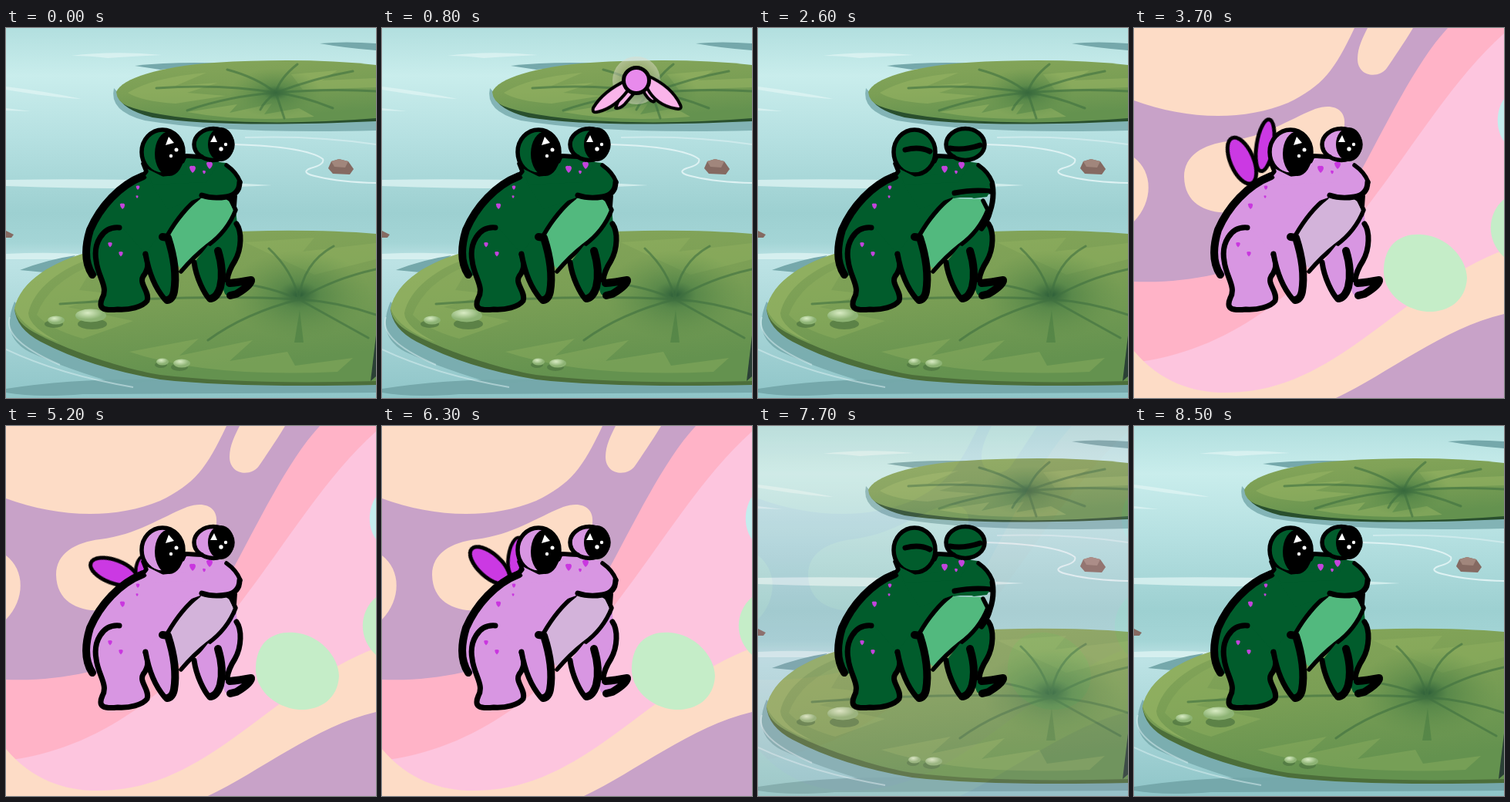
Recreate the animation shown at these times as an HTML page. Size 480 by 480 pixels, loop 8.6 s.

```html
<!DOCTYPE html>
<html lang="en">
<head>
<meta charset="utf-8">
<title>Frog daydream</title>
<style>
html, body { margin: 0; width: 100%; height: 100%; overflow: hidden; background: #bfe6e6; }
svg { display: block; width: 100%; height: 100%; }

.ink { fill: none; stroke: #000; stroke-linecap: round; stroke-linejoin: round; stroke-width: 7; }
.fine { stroke-width: 5.5; }
.bold { stroke-width: 10; }
.skin { fill: #015c2c; }
.belly { fill: #52b97e; }
.spot { fill: #c244dc; }
.vein { fill: none; stroke: #3f7040; stroke-linecap: round; opacity: .6; }

.dream, .skin, .belly, .spot, .open, .closed, .wings, .fairy { animation: 8.6s linear infinite; }
.skin { animation-name: skin; }
.belly { animation-name: belly; }
.spot { animation-name: spot; }
.open { animation-name: open; }
.closed { animation-name: closed; }
.wings { animation-name: trip; }
.skin, .belly, .spot, .open, .closed, .wings { animation-timing-function: step-end; }
.dream { animation-name: dissolve; }
.fairy { animation-name: visit; }

@keyframes skin { 0%, 80.23% { fill: #015c2c } 38.37% { fill: #d896e2 } 100% { fill: #015c2c } }
@keyframes belly { 0%, 80.23% { fill: #52b97e } 38.37% { fill: #d3b3da } 100% { fill: #52b97e } }
@keyframes spot { 0%, 80.23% { fill: #c244dc } 38.37% { fill: #c936df } 100% { fill: #c244dc } }
@keyframes trip { 0%, 80.23%, 100% { opacity: 0 } 38.37% { opacity: 1 } }
@keyframes open { 0%, 38.37%, 91.86%, 100% { opacity: 1 } 25.58%, 77.9% { opacity: 0 } }
@keyframes closed { 0%, 38.37%, 91.86%, 100% { opacity: 0 } 25.58%, 77.9% { opacity: 1 } }
@keyframes dissolve { 0%, 32.56% { opacity: 0 } 40.7%, 81.4% { opacity: 1 } 90.7%, 100% { opacity: 0 } }
@keyframes visit {
  0%, 1.1% { transform: translate(220px, -60px); animation-timing-function: ease-out }
  9.3% { transform: none; opacity: 1; animation-timing-function: ease-in-out }
  16.3% { transform: translate(-5px, 4px); animation-timing-function: ease-in }
  23.2% { transform: translate(-40px, 142px) scale(.25); opacity: 1 }
  23.3%, 100% { transform: translate(-40px, 142px) scale(.25); opacity: 0 }
}

.far, .near { animation: calc(8.6s / 14) ease-in-out infinite; }
.near { animation-name: near; }
.far { animation-name: far; }
@keyframes near {
  0%, 100% { transform: translate(140px, 172px) rotate(-23deg) }
  50% { transform: translate(140px, 189px) rotate(-70deg) }
}
@keyframes far {
  0%, 100% { transform: translate(170px, 152px) rotate(9deg) }
  50% { transform: translate(178px, 185px) rotate(9deg) scale(.85, .5) }
}
.flutter { animation: flutter calc(8.6s / 22) ease-in-out infinite; }
@keyframes flutter { 0%, 100% { transform: none } 50% { transform: scale(1, .45) } }
</style>
</head>
<body>
<svg viewBox="0 0 480 480" preserveAspectRatio="none">
<defs>
  <linearGradient id="water" x2="0" y2="1">
    <stop offset="0" stop-color="#b2dfdf"/><stop offset=".13" stop-color="#c9edec"/>
    <stop offset=".3" stop-color="#b5e0e1"/><stop offset=".5" stop-color="#9dd0d1"/>
    <stop offset=".58" stop-color="#a4d5d6"/><stop offset=".63" stop-color="#bde3e5"/>
    <stop offset="1" stop-color="#8fc5c8"/>
  </linearGradient>
  <linearGradient id="leaf" x2=".3" y2="1">
    <stop offset="0" stop-color="#86a65a"/><stop offset=".5" stop-color="#7b9f55"/><stop offset="1" stop-color="#64924f"/>
  </linearGradient>
  <radialGradient id="heart">
    <stop offset="0" stop-color="#2b5c38"/><stop offset=".3" stop-color="#477c44" stop-opacity=".6"/>
    <stop offset="1" stop-color="#5c8c4a" stop-opacity="0"/>
  </radialGradient>
  <radialGradient id="drop" cx=".4" cy=".3">
    <stop offset="0" stop-color="#d9ecc4"/><stop offset="1" stop-color="#8db374"/>
  </radialGradient>
  <radialGradient id="glow">
    <stop offset=".4" stop-color="#d8c8b8" stop-opacity=".2"/><stop offset="1" stop-color="#dfdccb" stop-opacity=".5"/>
  </radialGradient>
  <path id="fleck" d="M-4-3Q-2-5 0-4Q3-5 4-2Q4 2 0 5Q-4 1-4-3Z"/>
</defs>

<g id="pond">
  <path fill="url(#water)" d="M0 0H480V480H0Z"/>
  <g fill="#e0f5f4" opacity=".75">
    <path d="M85 36Q140 29 202 35Q160 37 132 39Q110 36 85 36Z"/>
    <path d="M0 76Q50 82 98 92Q60 90 0 80Z"/>
    <path d="M0 104L32 108L0 107Z"/>
    <path d="M0 197Q180 194 345 204Q200 212 0 205Z"/>
    <path d="M0 293Q60 290 104 294L70 300H0Z"/>
  </g>
  <g fill="#75a8ab">
    <path d="M167 49Q220 43 290 46L200 54Z"/>
    <path d="M407 20Q440 17 480 20V29Q440 26 407 20Z"/>
    <path d="M18 314Q55 300 90 295L60 318Z"/>
    <path d="M0 468Q90 454 200 456L480 458V473Q250 474 100 475Q40 480 0 473Z"/>
    <path d="M11 355Q-8 400 30 420Q80 443 150 463L210 455L40 385Z" opacity=".85"/>
    <path d="M140 78Q133 108 180 120Q290 138 480 133V112L160 100Z" opacity=".8"/>
  </g>
  <g fill="none" stroke="#def2f3" stroke-width="2">
    <path d="M296 151Q390 154 411 170Q414 177 395 182Q380 188 405 193Q435 200 480 201"/>
    <path d="M310 142Q400 139 480 151" opacity=".6"/>
    <path d="M0 417Q70 450 165 466M5 375Q-5 405 70 437" opacity=".5"/>
  </g>

  <path fill="#294f2d" d="M144 86Q150 106 190 116Q280 130 480 121V110L150 90Z"/>
  <path fill="url(#leaf)" d="M143 83C150 65 200 50 270 45Q390 38 480 48V117Q370 126 270 120Q190 114 157 101Q144 95 143 83Z"/>
  <g fill="#9ab765" opacity=".5">
    <path d="M158 84Q190 64 260 58L220 75L275 71L235 84L285 88L220 98Q175 95 158 84Z"/>
    <path d="M235 109L300 99L290 110L345 98L335 112L380 104L400 115Q310 123 235 109Z"/>
    <path d="M370 60L430 55L410 68L480 65V77L385 80Z"/>
  </g>
  <ellipse cx="350" cy="84" rx="60" ry="32" fill="url(#heart)"/>
  <g class="vein" stroke-width="3">
    <path d="M350 84Q290 88 235 107M350 84Q280 72 195 78M350 84Q325 64 287 54M350 84Q355 65 378 47M350 84Q400 65 450 56M350 84Q420 78 480 82M350 84Q385 88 424 104M350 84Q335 95 330 106M350 84L361 117"/>
  </g>

  <path fill="#4c6e3a" d="M11 364Q13 390 45 407Q110 441 200 456Q300 467 480 463V440L30 370Z"/>
  <path fill="url(#leaf)" d="M11 364C19 328 60 303 110 290Q220 264 340 263Q420 262 480 267V458Q310 463 200 450C140 440 60 410 30 391Q13 380 11 364Z"/>
  <path fill="#9ab766" opacity=".6" d="M11 364C19 328 60 303 110 290L120 296C70 310 35 340 29 370Q30 388 70 408Q22 391 11 364Z"/>
  <g fill="#98b764" opacity=".35">
    <path d="M40 372Q55 330 115 306L95 340L140 345L80 362L165 380L100 403Q55 390 40 372Z"/>
    <path d="M160 420L250 403L225 425L320 405L290 432L365 420L375 438L450 428L430 446Q260 454 160 420Z"/>
    <path d="M310 278L400 272L385 290L480 279V300L400 320Z"/>
  </g>
  <ellipse cx="380" cy="346" rx="92" ry="58" fill="url(#heart)"/>
  <g class="vein" stroke-width="3">
    <path d="M380 352Q372 315 341 286M380 352Q425 325 480 313M380 352Q310 370 262 405M380 352Q250 345 70 358M380 352Q430 355 480 372M380 352Q430 380 470 402M380 352Q385 305 425 283M380 352Q340 335 305 332"/>
    <path d="M381 366L374 408L386 408Z" fill="#4b7e43" stroke="none"/>
  </g>
  <g fill="#4d7440" opacity=".7">
    <ellipse cx="112" cy="384" rx="19" ry="7"/><ellipse cx="62" cy="384" rx="12" ry="5"/>
    <ellipse cx="201" cy="437" rx="8" ry="4"/><ellipse cx="225" cy="440" rx="11" ry="5"/>
  </g>
  <g fill="url(#drop)">
    <ellipse cx="110" cy="373" rx="20" ry="8.5"/><ellipse cx="65" cy="379" rx="11" ry="5.5"/>
    <ellipse cx="203" cy="433" rx="8" ry="4.5"/><ellipse cx="228" cy="435" rx="11" ry="5.5"/>
  </g>
  <path fill="#856a62" d="M418 182L422 173L432 170L444 173L451 183L446 190L424 189Z"/>
  <path fill="#a1867c" d="M422 173L432 170L444 173L440 181L426 180Z"/>
  <path fill="#856a62" d="M0 263L10 268L7 272H0Z"/>
  <path fill="#2b4036" d="M480 399L473 458L480 452Z"/>
</g>

<g class="dream">
  <path fill="#ffb3c7" d="M0 0H480V480H0Z"/>
  <path fill="#c8a2c8" d="M0 0H407C365 45 325 130 292 190C240 280 130 334 0 329Z"/>
  <path fill="#fdc5de" d="M480 7C415 65 365 150 305 228C220 345 120 420 0 434V480H480Z"/>
  <g fill="#fddcc6">
    <path d="M0 0H286C260 55 245 75 200 97C140 122 65 118 0 94Z"/>
    <path d="M303 0H362C350 20 336 40 328 52C318 66 290 64 290 40C290 25 297 12 303 0Z"/>
    <path d="M65 193C65 165 90 151 122 147C170 141 200 119 235 105C258 97 275 105 273 126C270 165 225 200 185 220C150 246 66 254 65 193Z"/>
    <path d="M0 168C25 187 25 225 0 251Z"/>
    <path d="M0 419C40 466 90 477 140 472C270 461 345 340 480 288V480H0Z"/>
  </g>
  <path fill="#c8a2c8" d="M262 480C330 448 400 390 480 371V480Z"/>
  <g fill="#c5edc8">
    <path d="M324 312C326 278 348 266 374 268C405 270 432 298 432 325C430 355 407 369 380 368C347 365 322 340 324 312Z"/>
    <path d="M480 222C457 242 457 276 480 297Z"/>
  </g>
  <path fill="#c4edee" d="M480 92C469 108 469 132 480 147Z"/>
</g>

<g class="fairy"><g transform="translate(330 68)">
  <circle r="31" fill="url(#glow)"/>
  <g class="flutter ink" style="fill:#fab4ea;stroke-width:4">
    <path d="M-10 12Q-22 20-27 36Q-22 38-15 31L-4 18Z"/>
    <path d="M8 12Q15 26 22 28Q28 26 18 10Z"/>
    <path d="M-13 0Q-43 14-56 36Q-58 44-49 41Q-28 36-11 13Z"/>
    <path d="M15-6Q46 8 57 32Q60 39 51 37Q25 32 14 10Z"/>
  </g>
  <circle r="16.5" fill="#e88aec" stroke="#000" stroke-width="5"/>
</g></g>

<g id="frog">
  <g class="wings ink" style="fill:#cb39e3;stroke-width:5">
    <ellipse class="far" rx="11" ry="34"/>
    <ellipse class="near" rx="15" ry="32"/>
  </g>

  <path class="skin" d="M298 236L300 254C308 264 308 285 299 304Q290 318 288 331Q308 322 320 327Q322 334 300 347Q288 350 284 345L262 282Z"/>
  <path class="ink" d="M299 254C306 264 306 286 297 302Q288 316 287 327"/>
  <path class="ink bold" d="M290 331Q302 330 318 327Q319 333 299 345L291 347"/>
  <path class="skin" d="M178 190C145 202 112 245 104 285L112 322L180 310L214 300L247 222L300 215L285 175L205 165Z"/>
  <path class="ink bold" d="M178 192C147 204 122 232 109 262C102 285 102 305 112 320"/>
  <path class="belly" d="M249 221L291 222L298 240Q287 264 262 282Q244 296 230 314L212 300L210 268Z"/>
  <path class="ink fine" d="M250 220Q228 237 210 268M292 224L298 236Q287 264 262 282Q243 297 227 316"/>
  <path class="skin" d="M246 302C246 322 257 344 264 353Q273 357 281 338Q285 315 277 287L262 282Z"/>
  <path class="ink" d="M244 304C247 325 257 344 264 352"/>
  <path class="ink bold" d="M266 351Q274 349 278 336Q283 315 275 289"/>

  <path class="skin" d="M180 190L210 160L234 168L264 168L288 179Q300 188 304 202Q300 219 282 220L252 220L210 235Z"/>
  <path class="ink fine" d="M229 173L232 166L254 167M286 178Q299 187 304 200"/>
  <g class="open">
    <path class="ink" d="M303 200Q303 216 286 219Q268 222 254 217"/>
    <path d="M284 221L300 217L298 245L291 226Z"/>
  </g>
  <g class="closed">
    <path class="ink" d="M255 214Q282 209 301 212M304 203Q307 220 301 238Q298 250 290 260"/>
    <path class="skin" d="M266 216L300 214L297 219L280 221Z"/>
  </g>

  <path class="skin" d="M150 258C125 256 113 280 117 302C119 322 134 335 125 350C119 364 126 367 145 366C160 367 177 362 184 354C187 342 172 332 178 322Q187 309 180 292Z"/>
  <path class="ink" d="M147 259C125 257 113 280 117 302C119 322 133 336 125 350C119 364 126 367 145 365C160 366 177 362 183 354C187 342 172 332 178 322Q188 309 181 294"/>
  <path class="skin" d="M181 293C184 316 194 341 204 352Q216 360 221 343Q225 316 213 270L199 268Z"/>
  <path class="ink" d="M181 293C185 316 194 338 206 352"/>
  <path class="ink bold" d="M209 353Q216 352 218 342Q223 312 210 272L203 271"/>

  <g class="ink fine">
    <ellipse class="skin" cx="203" cy="161" rx="27" ry="29"/>
    <ellipse class="skin" cx="269" cy="151" rx="25" ry="20.5"/>
  </g>
  <path class="skin" d="M182 182L204 193L234 190L234 171L254 172L274 178L260 200L190 203Z"/>
  <path class="ink fine" d="M178 176L182 186L178 191M229 172L232 166L254 167"/>
  <g class="open">
    <ellipse cx="212" cy="163" rx="19" ry="29"/>
    <ellipse cx="279" cy="151" rx="17" ry="22"/>
    <g fill="#fff">
      <path d="M211 141L218 149L207 152ZM270 139L274 148L265 148Z"/>
      <circle cx="214" cy="166" r="2.2"/><circle cx="221" cy="158" r="2.5"/>
      <circle cx="285" cy="151" r="2.2"/><circle cx="279" cy="157" r="2.7"/>
    </g>
  </g>
  <g class="closed ink">
    <path d="M191 158Q209 153 223 160"/>
    <path d="M249 156Q268 159 288 152"/>
  </g>

  <g class="spot">
    <use href="#fleck" x="242" y="183"/><use href="#fleck" x="264" y="178"/>
    <use href="#fleck" transform="translate(257 187) scale(.5)"/>
    <use href="#fleck" transform="translate(171 207) scale(.6)"/>
    <use href="#fleck" transform="translate(170 219) scale(.4)"/>
    <use href="#fleck" transform="translate(151 231) scale(.8)"/>
    <use href="#fleck" transform="translate(135 281) scale(.7)"/>
    <use href="#fleck" transform="translate(149 293) scale(.7)"/>
  </g>
</g>
</svg>
</body>
</html>
```
